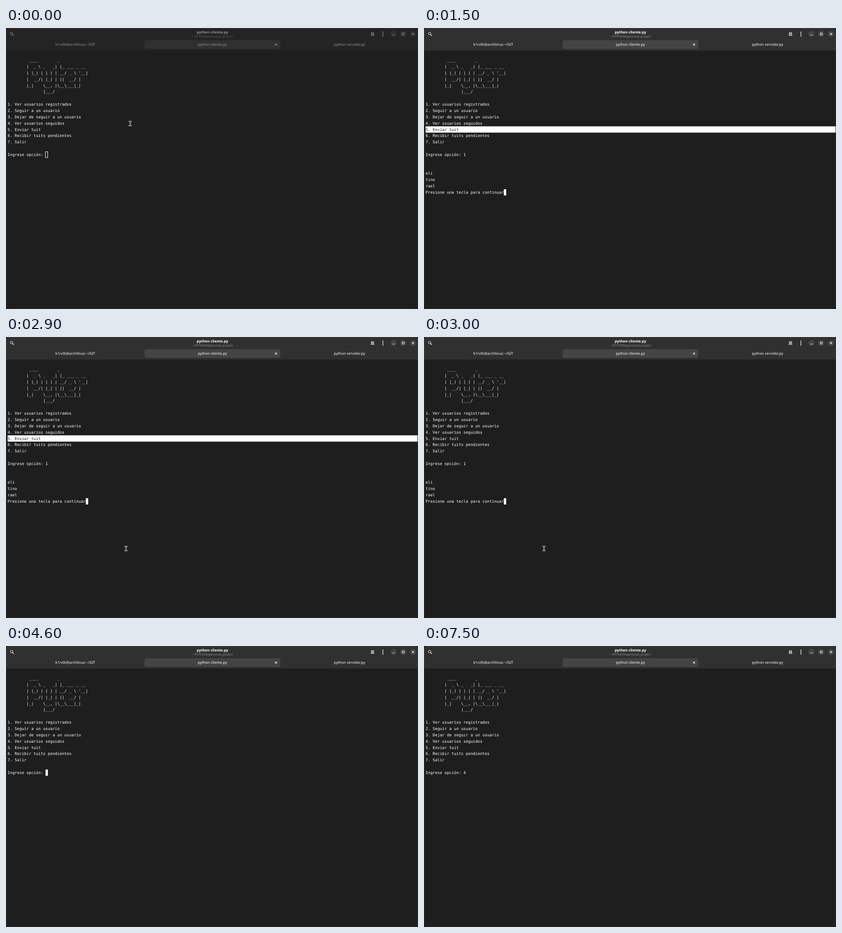
These frames come from a looping animation (904 by 619 pixels, 8000 ms). An HTML page with a canvas:

```html
<!DOCTYPE html>
<html lang="es">
<head>
<meta charset="utf-8">
<title>Terminal</title>
<style>
  html, body { margin: 0; width: 100%; height: 100%; overflow: hidden; background: #1e1e1e; }
  canvas { display: block; }
</style>
</head>
<body>
<canvas id="stage" width="904" height="619"></canvas>
<script>
const ctx = document.getElementById('stage').getContext('2d');
const W = 904, H = 619, LOOP = 8000;
const BG = '#1e1e1e', WHITE = '#ffffff';
const LEFT = 3.5, TOP = 50.4, ROW = 13.85, COL = 5.2, BASELINE = 9.9;
const MONO = '8.64px "DejaVu Sans Mono", monospace';
const UI = '"Noto Sans", "Open Sans", sans-serif';

const MENU = String.raw`
         ____        _
        |  _ \ _   _| |_ ___ _ __
        | |_) | | | | __/ _ \ '__|
        |  __/| |_| | ||  __/ |
        |_|    \__, |\__\___|_|
               |___/

1. Ver usuarios registrados
2. Seguir a un usuario
3. Dejar de seguir a un usuario
4. Ver usuarios seguidos
5. Enviar tuit
6. Recibir tuits pendientes
7. Salir
`.split('\n');
const PROMPT_ROW = 16, SELECTED_ROW = 12;
const PROMPT = 'Ingrese opción: ';
const RESULT = ['', '', 'eli', 'tino', 'rael', 'Presione una tecla para continuar'];

// Pointer positions: [time, x, y]; a missing position hides it.
const POINTER = [
  [0, 272.5, 210.5], [500, 287, 219.5], [600, 288, 221], [700, 288, 222], [800],
  [2600, 270, 509], [2700, 267, 495], [2800, 264, 475], [2900, 263.3, 466], [4500]
];
// Moments at which the block cursor restarts its blink, and its half period.
const BLINK_STARTS = [[500, 600], [800, 500], [1500, 600], [4600, 600], [6900, 600]];

const latest = (list, t) => list.filter(item => item[0] <= t).pop();

function text(str, x, y, font, color, align = 'left') {
  ctx.font = font;
  ctx.fillStyle = color;
  ctx.textAlign = align;
  ctx.fillText(str, x, y);
}

function line(points, width, color) {
  ctx.beginPath();
  points.forEach(([x, y], i) => i ? ctx.lineTo(x, y) : ctx.moveTo(x, y));
  ctx.lineWidth = width;
  ctx.strokeStyle = color;
  ctx.stroke();
}

function disc(x, y, r, color) {
  ctx.beginPath();
  ctx.arc(x, y, r, 0, Math.PI * 2);
  ctx.fillStyle = color;
  ctx.fill();
}

function cross(x, y, r, color) {
  line([[x - r, y - r], [x + r, y + r]], 1.1, color);
  line([[x + r, y - r], [x - r, y + r]], 1.1, color);
}

function header(focused) {
  const fg = focused ? WHITE : '#929292';
  const raised = focused ? '#444444' : '#303030';
  ctx.fillStyle = focused ? '#303030' : '#242424';
  ctx.fillRect(0, 0, W, 49.5);

  text('python cliente.py', 453, 11.7, `bold 7.95px ${UI}`, fg, 'center');
  text('~/PYTHON/personal_project', 453, 21.4, `6.75px ${UI}`, focused ? '#929292' : '#5e5e5e', 'center');

  ctx.fillStyle = raised;
  ctx.beginPath();
  ctx.roundRect(304, 27, 298, 19, 4);
  ctx.fill();
  const tabFont = `7.95px ${UI}`;
  text('k1rv0t@archlinux:~/GIT', 152, 38.9, tabFont, fg, 'center');
  text('python cliente.py', 452.8, 38.9, tabFont, fg, 'center');
  text('python servidor.py', 753.7, 38.9, tabFont, fg, 'center');
  cross(592.5, 36.5, 2.2, fg);

  // Search
  ctx.beginPath();
  ctx.arc(12.3, 12.3, 2.7, 0, Math.PI * 2);
  ctx.lineWidth = 1;
  ctx.strokeStyle = fg;
  ctx.stroke();
  line([[14.3, 14.3], [17.2, 17.2]], 1.3, fg);

  // New tab
  line([[800, 16.4], [808.3, 16.4]], 1, fg);
  line([[801.7, 16], [801.7, 10.2], [806.7, 10.2], [806.7, 16]], 1, fg);
  line([[804.2, 11.3], [804.2, 15.1]], 1, fg);
  line([[802.3, 13.2], [806.1, 13.2]], 1, fg);

  for (const y of [9.4, 13.3, 17.2]) disc(827, y, 1.2, fg);
  for (const x of [850.3, 871.6, 893]) disc(x, 13.2, 6.9, raised);
  line([[848, 15.5], [852.6, 15.5]], 1, fg);
  ctx.strokeRect(869.5, 11.1, 4.2, 4.2);
  cross(893, 13.2, 2.1, fg);
}

function terminal(t) {
  const showResult = t >= 1500 && t < 4600;
  const choice = t >= 6900 ? '4' : t >= 800 && t < 4600 ? '1' : '';
  const lines = [...MENU];
  lines[PROMPT_ROW] = PROMPT + choice;
  if (showResult) lines.push(...RESULT);

  const selected = t >= 500 && t < 3000;
  if (selected) {
    ctx.fillStyle = WHITE;
    ctx.fillRect(LEFT, TOP + SELECTED_ROW * ROW, 903 - LEFT, ROW);
  }
  lines.forEach((str, row) => {
    const color = selected && row === SELECTED_ROW ? BG : WHITE;
    text(str, LEFT, TOP + row * ROW + BASELINE, MONO, color);
  });
  blockCursor(t, lines.length - 1, lines[lines.length - 1].length);
}

function blockCursor(t, row, col) {
  const x = LEFT + col * COL, y = TOP + row * ROW;
  if (t < 500) {
    ctx.lineWidth = 1;
    ctx.strokeStyle = WHITE;
    ctx.strokeRect(86.5, 272.5, 5, 13);
    return;
  }
  const [start, half] = latest(BLINK_STARTS, t);
  if (Math.floor((t - start) / half) % 2) return;
  ctx.fillStyle = WHITE;
  ctx.fillRect(x, y, COL, ROW);
}

function pointer(t) {
  const [, x, y] = latest(POINTER, t);
  if (x === undefined) return;
  for (const [width, color] of [[2.3, '#e8e8e8'], [0.8, '#101010']]) {
    line([[x, y - 4.6], [x, y + 4.6]], width, color);
    for (const dy of [-4.6, 4.6]) {
      const reach = 2 + width / 2;
      line([[x - reach, y + dy], [x + reach, y + dy]], width, color);
    }
  }
}

function frameEdge() {
  ctx.beginPath();
  ctx.rect(0, 0, W, H);
  ctx.roundRect(0, 0, W, H, 5);
  ctx.fillStyle = '#101010';
  ctx.fill('evenodd');
  ctx.beginPath();
  ctx.roundRect(0.5, 0.5, W - 1, H - 1, 5);
  ctx.lineWidth = 1;
  ctx.strokeStyle = 'rgba(255,255,255,0.08)';
  ctx.stroke();
}

let origin;
function draw(now) {
  origin ??= now;
  const t = (now - origin) % LOOP;
  ctx.textRendering = 'geometricPrecision';
  ctx.fillStyle = BG;
  ctx.fillRect(0, 0, W, H);
  header(t >= 500);
  terminal(t);
  pointer(t);
  frameEdge();
  requestAnimationFrame(draw);
}
requestAnimationFrame(draw);
</script>
</body>
</html>
```
